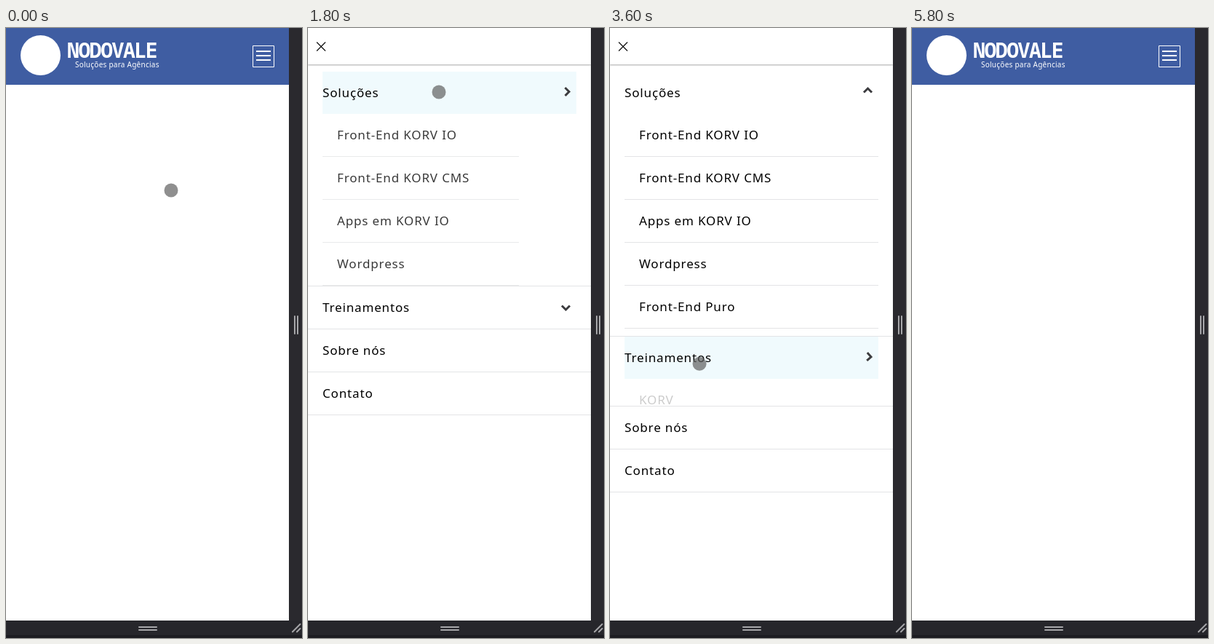
Write an HTML page that moves like this. It is 407 px wide and 838 px high and loops after 6000 ms.

```html
<!DOCTYPE html>
<html lang="pt">
<head>
<meta charset="utf-8">
<title>Menu</title>
<style>
html, body { margin: 0; width: 100%; height: 100%; overflow: hidden; background: #2a292e; }
body { position: relative; font: 17px/58px "Noto Sans", sans-serif; color: #000; }
svg { position: absolute; left: 0; top: 0; overflow: visible; fill: none; }
#page { position: absolute; width: 389px; height: 814px; overflow: hidden; background: #fff; }
#drawer { position: absolute; width: 389px; height: 814px; background: #fff; letter-spacing: .85px; white-space: nowrap; }
#bar { height: 50px; margin-bottom: 10px; box-shadow: 0 1px 2px rgba(0,0,0,.35); }
.item { border-bottom: 1px solid #e3e4e6; padding: 0 20px; }
.row { position: relative; height: 58px; }
.sub { height: 0; overflow: hidden; }
.sub div { height: 58px; padding-left: 20px; border-bottom: 1px solid #e3e4e6; }
#dot { position: absolute; left: -9.5px; top: -9.5px; width: 19px; height: 19px; border-radius: 50%; background: rgba(95,95,95,.7); }
#frame { position: absolute; left: 0; top: 0; width: 407px; height: 838px; overflow: hidden; pointer-events: none; }
</style>
</head>
<body>
<div id="page">
  <svg width="389" height="78">
    <path fill="#3f5da2" d="M0 0h389v78H0z"/>
    <circle cx="47.5" cy="37.5" r="27.5" fill="#fff"/>
    <text x="84" y="40.5" fill="#fff" font-family="Noto Sans Mono, monospace" font-weight="700" font-size="28" letter-spacing="-1.4">NODOVALE</text>
    <text x="95" y="54" fill="#fff" font-size="10" letter-spacing=".25">Soluções para Agências</text>
    <path stroke="#fff" d="M339.5 24.5h29v29h-29z"/>
    <path stroke="#fff" stroke-width="2" d="M344 32h20M344 38h20M344 44h20"/>
  </svg>
  <div id="drawer">
    <div id="bar"><svg width="36" height="50"><path stroke="#111" stroke-width="1.2" d="M12 19.5l12 12m0-12l-12 12"/></svg></div>
  </div>
</div>
<svg id="frame">
  <path fill="#26262b" d="M0 814h407v24H0z"/>
  <path fill="#1c1c21" d="M0 834h407v4H0z"/>
  <path stroke="#a6a6a9" stroke-width="2" stroke-linecap="round" d="M397 396v24M401 396v24M183 823h24M183 827h24M394 829.5l10.5-10.5M400 829.5l4.5-4.5"/>
</svg>
<div id="dot"></div>
<script>
const LOOP = 6000;
const MENU = [
  ['Soluções', 'Front-End KORV IO', 'Front-End KORV CMS', 'Apps em KORV IO', 'Wordpress', 'Front-End Puro'],
  ['Treinamentos', 'KORV Agência', 'KORV Lojista', 'Desenvolvedor Front-End'],
  ['Sobre nós'],
  ['Contato']
];
// Per submenu: opening and closing taps as [start, end of highlight]
const TAPS = [
  [[1664, 2200], [4560, 4790]],
  [[2760, 3290], [3460, 3960]]
];
// Pointer stops: time, x, y
const PATH = [
  [120, 226.5, 222.5], [690, 343.5, 37.5], [1110, 343.5, 37.5], [1500, 179.5, 87.5],
  [2100, 179.5, 87.5], [2600, 122.5, 462.5], [3600, 122.5, 462.5], [4260, 136.5, 99.5],
  [4320, 136.5, 99.5], [4560, 120.5, 93.5], [4900, 42.5, 37.5], [5180, 42.5, 37.5],
  [5400, 20.5, 27.5], [5550, 20.5, 27.5], [5780, 20.5, -14]
];

const drawer = document.getElementById('drawer');
const dot = document.getElementById('dot');
const ramp = (t, start, length) => Math.min(1, Math.max(0, (t - start) / length));
const swing = p => .5 - Math.cos(p * Math.PI) / 2;
const easeOut = p => 1 - (1 - p) ** 3;

// cubic-bezier(.25, .1, .25, 1)
function ease(p) {
  const curve = (s, a, b) => 3 * (1 - s) ** 2 * s * a + 3 * (1 - s) * s * s * b + s ** 3;
  let lo = 0, hi = 1;
  for (let i = 0; i < 24; i++) {
    const mid = (lo + hi) / 2;
    if (curve(mid, .25, .25) < p) lo = mid; else hi = mid;
  }
  return p <= 0 ? 0 : p >= 1 ? 1 : curve(lo, .1, 1);
}

const groups = [];
for (const [title, ...children] of MENU) {
  const item = document.createElement('div');
  item.className = 'item';
  item.innerHTML = `<div class="row">${title}</div>`;
  if (children.length) {
    item.firstChild.innerHTML += '<svg width="349" height="58"><path stroke="#3c3c3f" stroke-width="3" d="M-5.5-1L0 4.5 5.5-1"/></svg>';
    item.innerHTML += `<div class="sub">${children.map(c => `<div>${c}</div>`).join('')}</div>`;
    groups.push({
      row: item.firstChild,
      arrow: item.querySelector('path'),
      sub: item.lastChild,
      height: children.length * 59 + 10
    });
  }
  drawer.append(item);
}

function drawGroup({ row, arrow, sub, height }, [open, close], t) {
  const shown = swing(ramp(t, open[0], 200)) - swing(ramp(t, close[0], 200));
  const turn = ramp(t, open[0], 272) - ramp(t, close[0], 272);
  const glow = ([start, end]) => ramp(t, start, 60) * (1 - ramp(t, (start + end) / 2, (end - start) / 2));
  sub.style.height = Math.round(shown * height) + 'px';
  sub.style.width = Math.round(shown * 349) + 'px';
  sub.style.opacity = shown;
  arrow.setAttribute('transform', `translate(334.5 27.5) rotate(${-180 * turn})`);
  row.style.background = `rgba(240,250,253,${Math.max(glow(open), glow(close))})`;
}

function pointer(t) {
  let [, x, y] = PATH[0];
  for (let i = 1; i < PATH.length; i++) {
    const [t0, x0, y0] = PATH[i - 1], [t1, x1, y1] = PATH[i];
    if (t < t0) break;
    const p = easeOut(ramp(t, t0, t1 - t0));
    x = x0 + (x1 - x0) * p;
    y = y0 + (y1 - y0) * p;
  }
  return [x, y];
}

function draw(t) {
  const down = ease(ramp(t, 700, 480)) - ease(ramp(t, 5320, 470));
  drawer.style.transform = `translateY(${Math.round(814 * (down - 1))}px)`;
  groups.forEach((g, i) => drawGroup(g, TAPS[i], t));
  const [x, y] = pointer(t);
  dot.style.transform = `translate(${x}px, ${y}px)`;
}

function tick() {
  draw(performance.now() % LOOP);
  requestAnimationFrame(tick);
}
tick();
</script>
</body>
</html>
```
